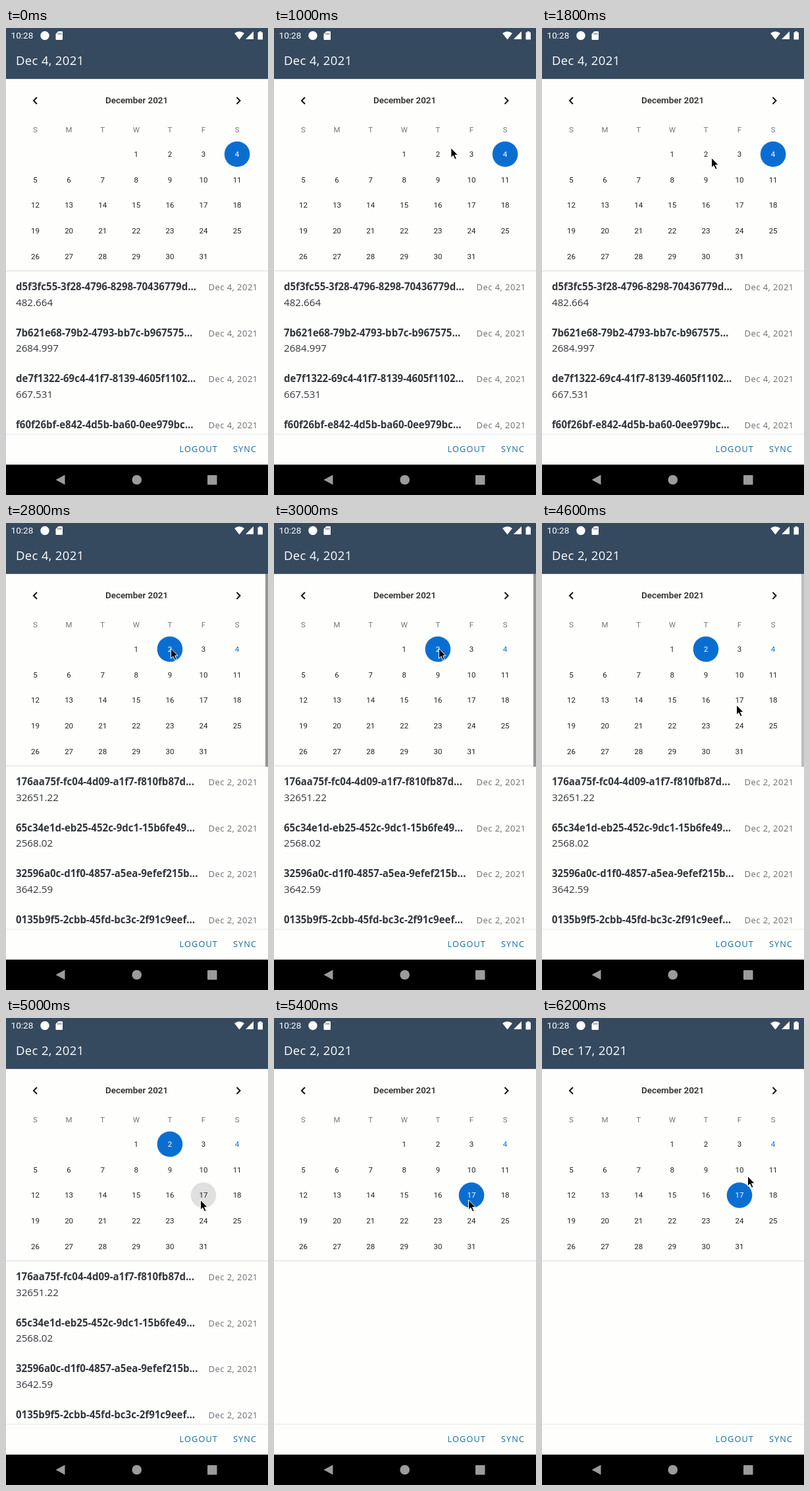
Recreate the animation shown at these times as an HTML page. Size 398 px wide and 707 px high, loop 6400 ms.

```html
<!DOCTYPE html>
<html lang="en">
<head>
<meta charset="utf-8">
<title>Calendar list</title>
<style>
  html, body { margin: 0; width: 100%; height: 100%; overflow: hidden; background: #fefefd; }
  svg { display: block; width: 398px; height: 707px; }
  text { font-family: "Open Sans", "Noto Sans", sans-serif; fill: #32363a; }
  .cal, .clock { font-family: Roboto, sans-serif; }
  .cal { font-size: 11.5px; text-anchor: middle; fill: #222; }
  .weekday { fill: #757575; }
  .month { font-size: 13.4px; font-weight: 500; }
  .clock { font-size: 13.6px; fill: #fff; }
  .title { font-size: 18.5px; font-weight: 500; letter-spacing: .35px; fill: #fff; }
  .id { font-size: 15.05px; font-weight: 700; }
  .amount { font-size: 15.2px; }
  .date { font-size: 13px; letter-spacing: .47px; fill: #6a6d70; }
  .button { font-size: 12.7px; font-weight: 500; letter-spacing: 1.15px; fill: #126c9c; }
</style>
</head>
<body>
<svg id="stage" viewBox="0 0 398 707">
  <rect width="398" height="707" fill="#fefefd"/>
  <rect y="77" width="398" height="1" fill="#dde0e2"/>
  <rect width="398" height="77" fill="#354a5f"/>

  <text class="clock" x="7.500" y="16.200">10:28</text>
  <g fill="#fff">
    <circle cx="59" cy="11.500" r="6.700"/>
    <path d="M79.500 5H85q1 0 1 1V17q0 1-1 1H76.500q-1 0-1-1V9Z"/>
    <path d="M347 8Q354.500 2.500 362 8L354.500 17.500Z"/>
    <path d="M364 17L376 5V17Z"/>
    <path d="M382.500 6.500H384.700V5H387.800V6.500H390V17.500H382.500Z"/>
  </g>
  <path d="M79 7.500V10M81.300 7.500V10M83.600 7.500V10" stroke="#354a5f"/>

  <g fill="none" stroke="#111" stroke-width="2">
    <path d="M47 105L42 110L47 115"/>
    <path d="M350.500 105L355.500 110L350.500 115"/>
  </g>
  <text class="cal month" x="198.500" y="114.200">December 2021</text>
  <rect y="367" width="398" height="1.300" fill="#e0e2e3"/>

  <text id="title" class="title" x="15" y="56"></text>
  <circle id="ripple" r="19.300" fill="#e0e0e0"/>
  <circle id="chosen" r="19.300" fill="#0a6ed1"/>
  <g id="month"></g>
  <g id="list"></g>
  <rect id="bar" x="394" y="77" width="4" height="292" fill="#959595"/>

  <rect y="614.500" width="398" height="47" fill="#fefefd"/>
  <rect y="614.500" width="398" height="1" fill="#e6e8e9"/>
  <text class="button" x="263.500" y="642">LOGOUT</text>
  <text class="button" x="345" y="642">SYNC</text>

  <rect y="661" width="398" height="46"/>
  <g fill="#9b9b9b">
    <path d="M75.500 684L89.500 676.500V691.500Z"/>
    <circle cx="198.700" cy="684" r="7.300"/>
    <rect x="306" y="677" width="14.500" height="14.500" rx="1"/>
  </g>
  <path id="cursor" d="M0 0V15L3.400 11.800L6 17.600L8.500 16.500L6 10.900H10.600Z" stroke="#fff" stroke-width="1"/>
</svg>
<script>
const LOOP = 6400, TICK = 200;
const $ = id => document.getElementById(id);

function addText(parent, cls, x, y, str) {
  const el = document.createElementNS("http://www.w3.org/2000/svg", "text");
  el.setAttribute("class", cls);
  el.setAttribute("x", x);
  el.setAttribute("y", y);
  el.textContent = str;
  return parent.appendChild(el);
}

// December 2021 starts on a Wednesday
const cell = day => {
  const n = day + 2;
  return [44.5 + 51.1 * (n % 7), 191 + 38.7 * Math.floor(n / 7)];
};

const days = [];
[..."SMTWTFS"].forEach((c, i) => addText($("month"), "cal weekday", 44.5 + 51.1 * i, 158.2, c));
for (let d = 1; d <= 31; d++) {
  const [x, y] = cell(d);
  days[d] = addText($("month"), "cal", x, y + 3.9, d);
}

const lists = {
  4: [["d5f3fc55-3f28-4796-8298-70436779d...", "482.664"],
      ["7b621e68-79b2-4793-bb7c-b967575...", "2684.997"],
      ["de7f1322-69c4-41f7-8139-4605f1102...", "667.531"],
      ["f60f26bf-e842-4d5b-ba60-0ee979bc...", ""]],
  2: [["176aa75f-fc04-4d09-a1f7-f810fb87d...", "32651.22"],
      ["65c34e1d-eb25-452c-9dc1-15b6fe49...", "2568.02"],
      ["32596a0c-d1f0-4857-a5ea-9efef215b...", "3642.59"],
      ["0135b9f5-2cbb-45fd-bc3c-2f91c9eef...", ""]]
};
const groups = {};
for (const day in lists) {
  const g = document.createElementNS("http://www.w3.org/2000/svg", "g");
  groups[day] = $("list").appendChild(g);
  lists[day].forEach(([id, amount], i) => {
    const y = 397 + 69.7 * i;
    addText(g, "id", 15, y, id);
    addText(g, "date", 307.5, y, `Dec ${day}, 2021`);
    addText(g, "amount", 15, y + 23.5, amount);
  });
}

// [time, value]: hard changes
const steps = {
  title: [[0, 4], [3200, 2], [6000, 17]],
  chosen: [[0, 4], [2200, 2], [5200, 17]],
  ripple: [[0, 0], [2000, 2], [2200, 0], [5000, 17], [5200, 0]],
  list: [[0, 4], [2400, 0], [2600, 2], [5400, 0]],
  bar: [[0, 0], [2600, 1], [4600, .6], [4800, .3], [5000, 0]]
};
// [time, x, y]: pointer path
const path = [[400, 330, 100], [1200, 257.5, 196.5], [1800, 257.5, 196.5], [2000, 250.5, 190],
  [3200, 250.5, 190], [4000, 290.5, 271.5], [4200, 295.5, 275.5], [5800, 295.5, 275.5], [6200, 312.5, 239.5]];

const valueAt = (key, t) => steps[key].filter(s => s[0] <= t).pop()[1];

function pointerAt(t) {
  const i = path.findIndex(p => p[0] > t);
  if (i < 0) return path[path.length - 1].slice(1);
  const [t0, x0, y0] = path[i - 1], [t1, x1, y1] = path[i];
  const u = (t - t0) / (t1 - t0), e = u * u * (3 - 2 * u);
  return [x0 + (x1 - x0) * e, y0 + (y1 - y0) * e];
}

function place(el, day) {
  el.style.display = day ? "" : "none";
  if (!day) return;
  const [x, y] = cell(day);
  el.setAttribute("cx", x);
  el.setAttribute("cy", y);
}

function draw(t) {
  const chosen = valueAt("chosen", t), list = valueAt("list", t);
  $("title").textContent = `Dec ${valueAt("title", t)}, 2021`;
  place($("chosen"), chosen);
  place($("ripple"), valueAt("ripple", t));
  days.forEach((el, d) => el.style.fill = d === chosen ? "#fff" : d === 4 ? "#0a6ed1" : "");
  for (const day in groups) groups[day].style.display = +day === list ? "" : "none";
  $("bar").style.opacity = valueAt("bar", t);
  const shown = t >= path[0][0];
  $("cursor").style.display = shown ? "" : "none";
  if (shown) $("cursor").setAttribute("transform", `translate(${pointerAt(t)})`);
}

const start = performance.now();
let last = -1;
function loop() {
  const t = Math.floor((performance.now() - start) % LOOP / TICK) * TICK;
  if (t !== last) draw(last = t);
  requestAnimationFrame(loop);
}
loop();
</script>
</body>
</html>
```
